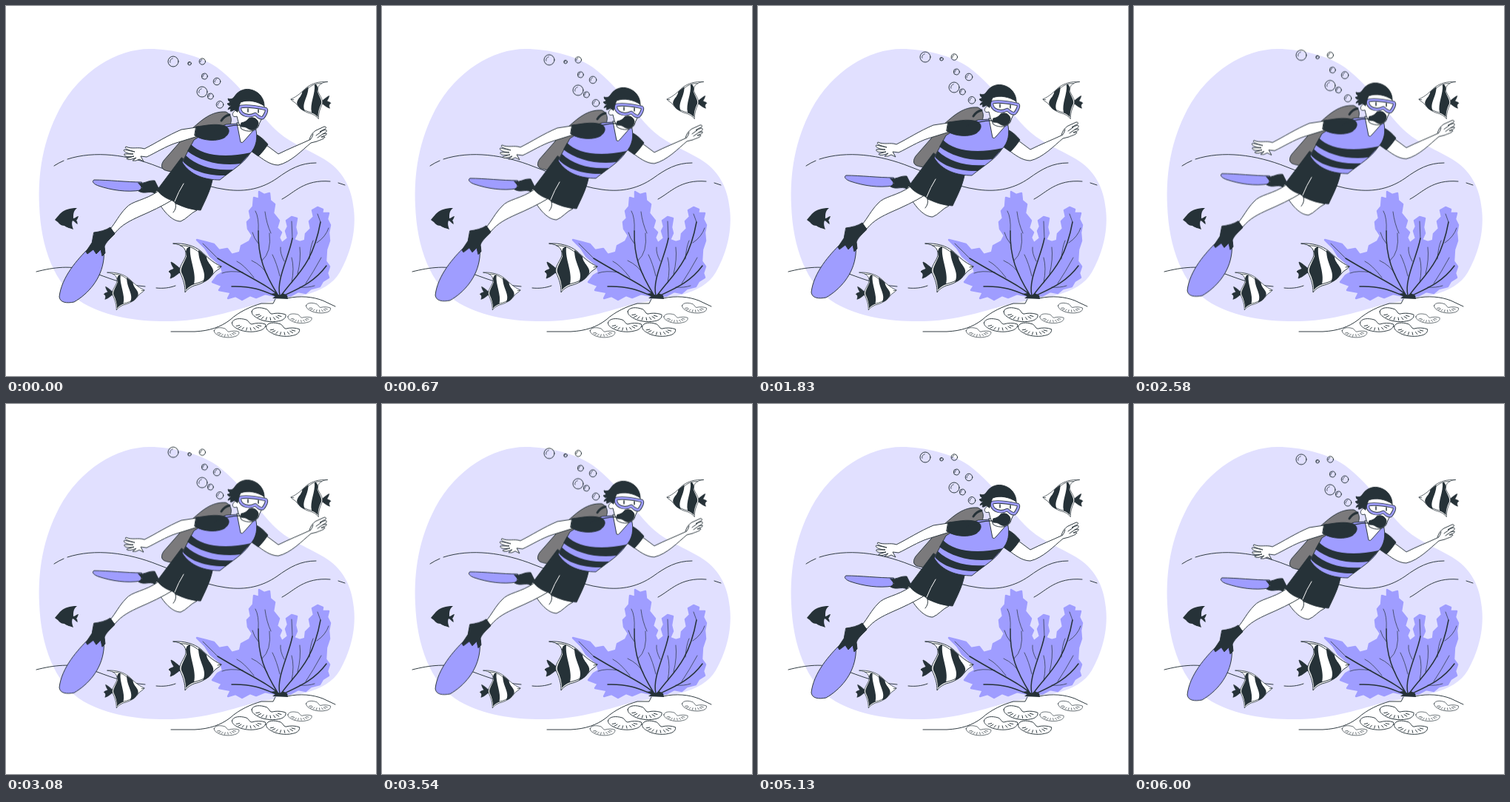
An HTML page that plays this animation: 500x500 px, repeating every 6040 ms.

```html
<!DOCTYPE html>
<html lang="en">
<head>
<meta charset="utf-8">
<title>Scuba diver</title>
<style>
  html, body { margin: 0; width: 100%; height: 100%; overflow: hidden; background: #fff; }
  svg { display: block; width: 100vw; height: 100vh; }
  .ink { fill: none; stroke: #263238; stroke-width: .95; stroke-linecap: round; stroke-linejoin: round; }
  .dark { fill: #263238; }
  .skin { fill: #fff; }
  .lilac { fill: #9f9dff; }
  .none { stroke: none; }
  #diver { animation: float 6040ms linear infinite; }
  @keyframes float {
    0%, 100% { transform: translateY(0); }
    50% { transform: translateY(-10px); }
  }
</style>
</head>
<body>
<svg viewBox="0 0 500 500">
  <defs>
    <!-- Striped fish, nose at the origin, facing right -->
    <g id="fish" class="ink">
      <path class="dark" d="M-54 4 C-60 0 -63 -4 -68 -6 C-67 -1 -65 1 -64 3 C-67 5 -70 5 -71 7 C-68 9 -67 11 -69 16 C-62 14 -59 9 -54 7Z"/>
      <path class="skin" d="M-65 -31 C-50 -32 -37 -28 -28 -21 C-19 -13 -13 -6 0 0 C-2 4 -8 5 -11 10 C-18 20 -29 24 -37 26 C-44 29 -47 32 -49 35 C-49 26 -51 18 -56 8 C-58 0 -50 -7 -48 -15 C-47 -25 -54 -30 -65 -31Z"/>
      <path class="dark none" d="M-48 -20 C-47 -25 -45 -27 -42 -26 C-44 -10 -33 8 -37 24 C-43 27 -46 29 -48 32 C-48 24 -50 16 -54 8 C-56 2 -49 -7 -47 -14Z"/>
      <path class="dark none" d="M-31 -22 C-27 -20 -23 -16 -20 -13 C-20 -5 -9 1 -11 9 C-15 16 -19 20 -25 21 C-18 8 -31 -3 -31 -22Z"/>
      <path d="M-55 -28 C-45 -29 -37 -25 -30 -19 M-43 25 C-34 23 -22 21 -15 12 M-5 1 L0 0"/>
      <circle cx="-15" cy="-5" r="1.5" fill="#fff" stroke="none"/>
    </g>
    <!-- Small fan shell -->
    <g id="shell" class="ink">
      <path class="skin" d="M-23 -3 C-22 -9 -12 -10 -3 -7 C1 -5 0 -2 4 -1 C10 -3 18 -3 23 -1 C24 3 20 7 14 8 C4 11 -10 9 -16 5 C-20 3 -23 1 -23 -3Z"/>
      <path id="ribs" d=""/>
    </g>
  </defs>

  <path fill="#e1e0ff" d="M194 58 C150 58 100 88 72 140 C50 182 43 225 45 270 C47 325 65 378 105 402 C140 422 185 427 225 426 C280 424 315 408 345 402 C385 394 432 392 451 360 C468 330 473 300 470 275 C467 245 455 222 430 207 C405 192 380 184 360 163 C335 136 315 105 285 83 C262 67 225 58 194 58Z"/>

  <g class="ink">
    <path d="M65 216 Q71 212 78 209 M83 207 C120 195 165 201 205 217 C235 228 265 244 297 248 C325 252 347 246 366 233 C384 220 398 212 419 212"/>
    <path d="M373 261 C390 252 403 234 438 237 M449 239 L458 242"/>
    <path d="M41 359 C65 353 88 350 112 358 C140 368 160 377 188 379 M203 381 C212 382 221 381 229 378"/>
  </g>

  <path class="dark" d="M66 289 C72 283 75 273 96 273 C91 277 91 281 91 287 C94 287 95 284 98 284 C97 287 96 289 95 290 C97 291 96 293 97 295 C94 294 93 291 90 290 C88 294 90 299 91 302 C86 300 83 300 79 297 C74 297 72 294 70 292Z"/>

  <!-- Coral -->
  <g class="lilac" stroke="#9f9dff" stroke-width="2.5" stroke-linejoin="round">
    <path d="M370 393 L350 389 L338 394 L330 391 L319 397 L310 392 L300 395 L304 387 L288 384 L292 378 L279 373 L286 364 L293 360 L290 350 L276 338 L269 327 L258 316 L270 319 L281 322 L288 330 L299 328 L305 336 L316 333 L318 324 L329 318 L333 310 L327 301 L326 292 L331 287 L329 277 L334 271 L335 259 L342 261 L342 251 L349 255 L356 253 L357 263 L363 268 L361 280 L369 290 L366 300 L372 306 L369 313 L373 321Z"/>
    <path d="M368 393 L371 322 L381 314 L378 304 L381 298 L379 290 L386 285 L393 287 L391 299 L393 307 L389 316 L397 319 L404 317 L405 308 L412 301 L410 291 L416 285 L414 276 L421 272 L428 275 L427 280 L436 280 L434 288 L438 296 L436 306 L437 317 L433 329 L432 345 L437 352 L434 361 L436 367 L428 372 L424 379 L412 382 L405 388 L395 386 L382 393Z"/>
  </g>
  <g class="ink">
    <path stroke-width="1.5" d="M368 391 C355 378 327 366 286 341 M367 390 C350 362 340 340 341 304 M370 391 C365 370 382 340 387 314 M372 391 C390 365 414 352 425 292 M374 392 C395 382 416 374 433 351 M365 392 C350 386 335 378 305 379"/>
    <path stroke-width=".7" d="M286 341 Q276 331 266 321 M341 304 Q342 286 337 277 M387 314 L386 291 M425 292 L421 281 M320 360 Q302 357 292 361 M335 367 Q322 350 312 345 M353 363 Q347 351 332 344 M346 344 Q359 333 356 307 M341 321 Q335 314 333 306 M358 307 Q352 294 350 278 M370 365 Q366 348 360 336 M376 345 Q370 334 371 326 M394 362 Q399 342 397 326 M410 342 Q411 326 415 317 M420 320 Q432 312 436 300 M397 380 Q408 381 417 378 M386 374 Q390 354 386 340 M405 375 Q415 360 426 340"/>
  </g>

  <!-- Sea bed -->
  <path fill="#fff" d="M223 440 H255 C275 439 290 434 303 424 C315 413 331 406 345 402 L361 402 L364 396 C385 392 405 391 423 396 Q436 400 445 406 L445 440 L340 450Z"/>
  <path class="ink" d="M223 440 H255 C275 439 290 434 303 424 C315 413 331 406 345 402 L361 402 L364 396 M380 395 C398 391 415 393 428 398 L445 406"/>
  <path class="dark" d="M357 389 L364 388 L370 391 L374 388 L380 391 L381 396 L360 395 L364 392Z"/>
  <g id="shells"></g>

  <use href="#fish" transform="translate(291 352)"/>
  <use href="#fish" transform="translate(187 384) scale(.77)"/>
  <use href="#fish" transform="translate(385 126) scale(-.76 .76)"/>

  <g id="diver" class="ink">
    <g id="bubbles"></g>

    <!-- Far leg and fin -->
    <path class="skin" d="M200 241 C207 251 228 262 229 267 L258 276 C249 280 244 288 236 291 C225 291 213 279 203 260Z"/>
    <path class="lilac" d="M183 238 C163 238 138 235 119 235 C115 237 119 241 125 243 C143 249 163 252 182 249Z"/>
    <path class="dark" d="M179 239 C187 241 192 235 201 236 L206 246 L201 253 C193 249 188 255 179 250 L184 246Z"/>

    <!-- Tank -->
    <path fill="#7b7a7c" d="M213 209 L248 169 C265 153 278 142 297 143 C306 147 306 156 301 165 L242 206 L226 224 C217 223 208 222 211 213Z"/>
    <path stroke-width="3" d="M302 147 C297 148 294 150 291 155"/>

    <!-- Near leg, boot and fin -->
    <path class="skin" d="M206 250 C188 263 170 263 162 273 C153 282 148 293 141 301 L147 307 C157 295 168 290 181 284 C195 278 212 270 225 262Z"/>
    <path class="lilac" d="M111 328 C97 342 75 366 72 393 C73 401 82 402 92 400 C111 389 129 369 132 342 L133 328Z"/>
    <path class="dark" d="M119 306 C127 305 135 303 141 299 L147 308 C142 313 135 319 133 325 L134 334 L130 338 L128 329 L122 335 L118 329 L110 335 L108 332 L116 320Z"/>

    <!-- Shorts -->
    <path class="dark" d="M237 205 L204 249 C210 256 216 260 225 263 L229 266 C239 272 250 275 263 276 C269 263 276 250 279 235Z"/>
    <path stroke="#fff" stroke-width="1" d="M240 240 Q233 251 228 264"/>
    <path d="M229 267 Q231 273 226 279"/>

    <!-- Right arm -->
    <path class="skin" d="M352 188 L368 200 C382 193 397 187 410 181 C411 176 414 171 419 168 L430 163 C434 163 433 166 429 167 L424 170 L432 167 C435 169 432 171 428 173 L433 172 C434 175 430 175 426 177 L431 177 C430 180 424 181 420 183 L412 185 C400 195 385 211 368 215 C357 215 347 207 339 201Z"/>
    <path d="M419 175 L426 170 M421 178 L428 173 M411 181 Q414 178 415 173"/>
    <path class="dark" d="M337 173 C344 176 350 182 354 187 C350 193 346 198 341 203 L331 196Z"/>

    <!-- Vest -->
    <path class="lilac" d="M298 160 L313 159 L319 184 L337 164 C341 178 338 191 330 199 C320 214 306 221 289 235 C269 235 249 229 238 211 L254 181 L275 168Z"/>
    <path class="dark none" d="M250 187 C263 200 290 207 331 198 L317 213 C292 217 262 210 245 196Z"/>
    <path class="dark none" d="M243 202 C258 216 280 223 307 221 L297 229 C274 230 250 223 239 210Z"/>
    <path class="skin" d="M312 158 L317 184 Q319 186 322 182 L337 165Z"/>

    <!-- Left arm -->
    <path class="skin" d="M257 164 L237 167 C218 175 203 185 187 193 C179 190 170 194 162 190 C159 193 167 195 174 197 L160 194 C157 196 164 200 172 200 L160 200 C159 204 166 204 173 203 L163 206 C164 209 171 207 176 205 L171 209 Q176 210 180 207 L186 210 L182 203 L190 204 C201 199 217 189 230 185 L259 176Z"/>
    <path class="dark" d="M257 163 C269 162 282 158 296 162 C304 166 302 173 295 178 C286 183 267 183 255 175Z"/>

    <!-- Head -->
    <path class="skin" d="M314 131 C325 125 341 127 349 135 L350 147 C346 151 343 156 341 163 C337 170 326 171 318 166 L314 157 L312 149 C305 152 304 143 311 141Z"/>
    <path class="dark" d="M311 142 C308 138 307 143 303 142 C305 139 303 138 300 140 C301 136 304 136 304 134 Q301 136 299 132 Q302 132 303 129 Q300 129 300 125 C304 127 307 125 309 122 C314 114 324 110 334 114 C343 117 349 126 349 135 C340 129 327 126 317 130 C315 134 314 139 313 143Z"/>
    <g id="mask">
      <path id="frame" fill="#fff" stroke-width="4.5" d="M317 136 C329 134 341 137 351 139 C354 141 349 149 347 151 C343 152 340 149 337 146 C331 149 324 149 319 145 C316 142 315 138 317 136Z"/>
      <use href="#frame" id="tint"/>
    </g>
    <path stroke="#9f9dff" stroke-width="2.8" d="M317 136 C329 134 341 137 351 139 C354 141 349 149 347 151 C343 152 340 149 337 146 C331 149 324 149 319 145 C316 142 315 138 317 136Z"/>
    <path stroke-width="1.5" d="M327 139 V143 M341 140 V144"/>
    <path class="dark" d="M318 158 C323 157 326 155 328 152 C333 149 340 152 341 158 C341 164 336 169 330 167 C326 166 326 163 318 163Z"/>
    <path stroke-width="1.4" d="M319 161 C307 160 291 164 281 170"/>
  </g>
</svg>

<script>
  const NS = "http://www.w3.org/2000/svg";
  const byId = id => document.getElementById(id);

  function add(parent, tag, attrs) {
    const node = document.createElementNS(NS, tag);
    for (const key in attrs) node.setAttribute(key, attrs[key]);
    return parent.appendChild(node);
  }

  byId("tint").remove();

  // Short ribs along the lower rim of the shell
  let ribs = "";
  for (let i = 0; i < 8; i++) {
    const a = Math.PI * (0.1 + i * 0.115);
    const x = Math.cos(a), y = Math.sin(a);
    ribs += `M${x * 13} ${y * 5 - 1} L${x * 18} ${y * 8.5 - 1}`;
  }
  byId("ribs").setAttribute("d", ribs);

  // x, y, scale, angle
  [[422, 408, .72, 3], [355, 417, 1, 3], [397, 422, .7, 0],
   [328, 431, .98, 0], [374, 437, .98, 2], [298, 441, .73, 0]]
    .forEach(([x, y, s, a]) => add(byId("shells"), "use", {
      href: "#shell", transform: `translate(${x} ${y}) rotate(${a}) scale(${s})`
    }));

  // x, y, radius
  [[226, 75, 7], [248, 77.7, 2.3], [265.3, 75, 4.2], [268.3, 95, 4],
   [285, 102, 4.8], [265, 116, 7], [276.3, 122, 4], [289, 133.3, 4.8]]
    .forEach(([x, y, r]) => {
      const group = byId("bubbles");
      add(group, "circle", { cx: x, cy: y, r });
      const q = r * .6;
      add(group, "path", {
        d: `M${x - q} ${y + q * .3} A${q} ${q} 0 0 1 ${x - q * .2} ${y - q}`,
        "stroke-width": .8
      });
    });
</script>
</body>
</html>
```
